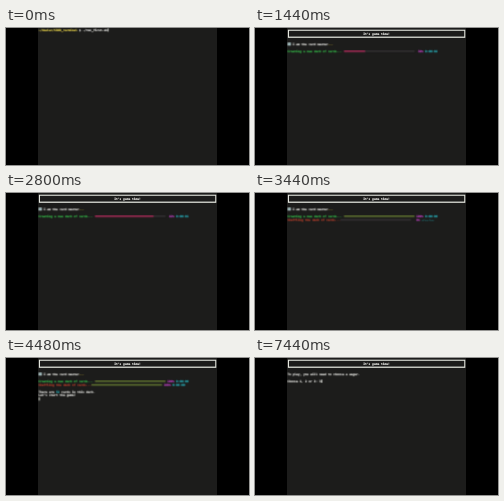
These frames come from a looping animation (243x137 px, 8000 ms). An HTML page:

```html
<!DOCTYPE html>
<html lang="en">
<head>
<meta charset="utf-8">
<title>Card game terminal</title>
<style>
@property --p { syntax: "<integer>"; inherits: true; initial-value: 0; }
@property --bar { syntax: "<color>"; inherits: true; initial-value: #f92672; }

html, body { margin: 0; width: 100%; height: 100%; overflow: hidden; background: #000; }

.term {
  position: absolute; left: 32px; top: 0; width: 179px; height: 137px;
  overflow: hidden; background: #1c1c1b;
}

/* Character grid: 101 columns of 10 x 20 units, scaled down to the stage */
.grid {
  position: absolute; left: 0; top: 0; width: 1010px; height: 770px;
  transform: translate(.4px, .3px) scale(.1765); transform-origin: 0 0;
  font: bold 16.61px/20px "DejaVu Sans Mono", monospace;
  text-rendering: geometricPrecision; white-space: pre; color: #f6f6f2;
  -webkit-text-stroke: .6px currentColor;
}
.grid div, .grid i { position: absolute; }
.grid .group { left: 0; top: 0; }
.grid .t { left: calc(var(--c, 0) * 10px); top: calc(var(--r) * 20px); }
.cursor {
  left: calc(var(--c, 0) * 10px + 1px); top: calc(var(--r) * 20px + 1px);
  width: 7px; height: 18px; background: #c4c6c0;
}
.panel {
  left: 1.5px; top: 6.5px; width: 1007px; height: 47px; box-sizing: border-box;
  border: 7px solid #e6e8e0; line-height: 33px; text-align: center;
}
.card { left: 1px; top: 81px; width: 18px; height: 17px; background: #bcd2d2; }
.card::after {
  content: ""; position: absolute; left: 7px; top: 6px; width: 5px; height: 7px;
  background: #4d7480;
}
.path { color: #e8d44c; }
.dots { color: #cdbb3c; }
.num { color: #2bb8c4; }

/* Progress rows */
.task { left: 0; top: calc(var(--r) * 20px); width: 1000px; height: 20px; }
.label, .pct, .eta { top: 0; }
.label { left: 0; color: var(--ink); }
.track, .fill { top: 8px; height: 4.5px; }
.track { left: calc(var(--x) * 10px); width: 400px; background: #454145; }
.grid .fill { left: 0; top: 0; width: calc(var(--p) * 4px); background: var(--bar); }
.pct { left: calc(var(--x) * 10px + 410px); width: 40px; text-align: right; color: #c045c6; }
.pct::after { counter-reset: p var(--p); content: counter(p) "%"; }
.eta { left: calc(var(--x) * 10px + 460px); color: #2bb8c4; }

.prompt, .panel, .game, .create, .shuffle, .deck, .wager, .typed, .move, .eta::after {
  animation: 8s step-end infinite;
}
.prompt { animation-name: prompt; }
.panel { animation-name: panel; }
.game { animation-name: game; }
.create { animation-name: show-create, run-create; }
.shuffle { animation-name: show-shuffle, run-shuffle; }
.deck { animation-name: deck; }
.wager { animation-name: wager; }
.typed { animation-name: typed; }
.move { animation-name: move; }
.create .eta::after { content: "-:--:--"; animation-name: eta-create; }
.shuffle .eta::after { content: "-:--:--"; animation-name: eta-shuffle; }

@keyframes prompt { 0% { opacity: 1 } 5%, 100% { opacity: 0 } }
@keyframes panel { 0% { opacity: 0 } 5%, 100% { opacity: 1 } }
@keyframes game { 0% { opacity: 0 } 5% { opacity: 1 } 82%, 100% { opacity: 0 } }
@keyframes show-create { 0% { opacity: 0 } 7%, 100% { opacity: 1 } }
@keyframes show-shuffle { 0% { opacity: 0 } 42%, 100% { opacity: 1 } }
@keyframes deck { 0% { opacity: 0 } 55%, 100% { opacity: 1 } }
@keyframes wager { 0% { opacity: 0 } 82%, 100% { opacity: 1 } }
@keyframes typed { 0% { opacity: 0 } 93%, 100% { opacity: 1 } }
@keyframes move { 0% { transform: none } 93%, 100% { transform: translateX(10px) } }

@keyframes run-create {
  0% { --p: 0; --bar: #f92672; }
  9% { --p: 2; --bar: #f92672; animation-timing-function: steps(31); }
  39.99% { --p: 99; --bar: #f92672; }
  40%, 100% { --p: 100; --bar: #7da02f; }
}
@keyframes run-shuffle {
  0% { --p: 0; --bar: #f92672; }
  43% { --p: 0; --bar: #f92672; animation-timing-function: steps(11); }
  53.99% { --p: 99; --bar: #f92672; }
  54%, 100% { --p: 100; --bar: #7da02f; }
}
@keyframes eta-create {
  0% { content: "-:--:--" }
  9% { content: "0:00:03" }
  15% { content: "0:00:02" }
  28% { content: "0:00:01" }
  40%, 100% { content: "0:00:00" }
}
@keyframes eta-shuffle {
  0% { content: "-:--:--" }
  45% { content: "0:00:01" }
  54%, 100% { content: "0:00:00" }
}
</style>
</head>
<body>
<div class="term"><div class="grid">
  <div class="group prompt">
    <div class="t" style="--r:0"><span class="path">~/dealer/CARD_terminal</span> $ ./run_first.sh</div>
    <div class="cursor" style="--r:0;--c:39"></div>
  </div>

  <div class="panel">It's game time!</div>

  <div class="group game">
    <div class="card"></div>
    <div class="t" style="--r:4;--c:3">I am the card master<span class="dots">...</span></div>
    <div class="task create" style="--r:6;--x:32;--ink:#38c04c">
      <div class="label">Creating a new deck of cards...</div>
      <div class="track"><i class="fill"></i></div>
      <div class="pct"></div>
      <div class="eta"></div>
    </div>
    <div class="task shuffle" style="--r:7;--x:30;--ink:#c0432f">
      <div class="label">Shuffling the deck of cards...</div>
      <div class="track"><i class="fill"></i></div>
      <div class="pct"></div>
      <div class="eta"></div>
    </div>
    <div class="group deck">
      <div class="t" style="--r:9">There are <span class="num">52</span> cards in this deck.</div>
      <div class="t" style="--r:10">Let's start the game!</div>
      <div class="cursor" style="--r:11"></div>
    </div>
  </div>

  <div class="group wager">
    <div class="t" style="--r:4">To play, you will need to choose a wager.</div>
    <div class="t" style="--r:6">Choose 1, 2 or 3: </div>
    <div class="t typed" style="--r:6;--c:18">3</div>
    <div class="cursor move" style="--r:6;--c:18"></div>
  </div>
</div></div>
</body>
</html>
```
